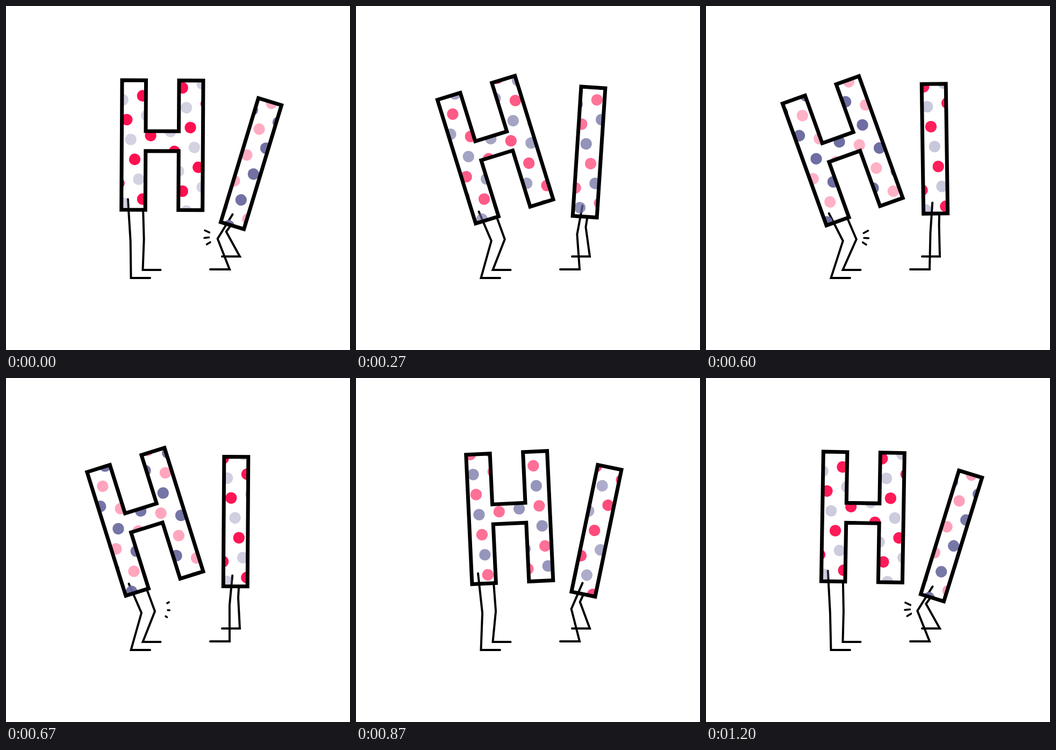
An HTML page with a canvas that plays this animation: 640x640 px, repeating every 1230 ms.

```html
<!DOCTYPE html>
<html lang="en">
<head>
<meta charset="utf-8">
<title>HI</title>
<style>
  html, body { margin: 0; width: 100%; height: 100%; overflow: hidden; background: #fff; }
  canvas { display: block; }
</style>
</head>
<body>
<canvas id="stage" width="640" height="640"></canvas>
<script>
const ctx = document.getElementById('stage').getContext('2d');
const LOOP = 1230, CYCLE = 31, RAD = Math.PI / 180;
const RED = '#ff0f50', SLATE = '#6b6ba0';

// Lean runs from `lean` to `lean - sweep` degrees; `bow` shifts the body sideways midway
const letters = [
  {
    lag: 0, pivot: [301.65, 367], lean: 1.45, sweep: 22.1, bow: 5,
    outline: [[214.5, 138.5], [259, 138.5], [259, 233], [320.5, 233], [320.5, 138.5], [365.5, 138.5],
              [365.5, 379.5], [320.5, 379.5], [320.5, 270], [259, 270], [259, 379.5], [214.5, 379.5]],
    dots: { center: [117.5, 190], origin: [239, 286], tilt: -11, turn: a => -a },
    redAlpha: fade => 1 - 0.7 * fade,
    front: { hip: [226.5, 360], knee: a => [232 - 1.15 * a, 437], foot: [[232.5, 506], [268, 506]] },
    back: { hip: [254, 352], knee: a => [257 - 1.15 * a, 434], foot: [[254.5, 491], [287.5, 491]] },
    ticks: { start: 9, lines: [[301.5, 418, -29], [302.5, 432, 3], [298, 444, 34]] }
  },
  {
    lag: 1, pivot: [351.7, 377.9], lean: 17.3, sweep: 18.4, bow: -3.5,
    outline: [[404.6, 146.1], [449.6, 146.1], [449.6, 387.1], [404.6, 387.1]],
    dots: { center: [301.5, 186], origin: [448, 277], tilt: -19.4, turn: a => (16.97 - a) / 2 },
    redAlpha: fade => 0.3 + 0.7 * fade,
    front: { hip: [421.4, 367], knee: a => [416.4 - 1.347 * a, 422.5 + 0.617 * a], foot: [[416, 490], [380, 490]] },
    back: { hip: [435, 355], knee: a => [432.5 - 1.35 * a, 408.7 + 0.67 * a], foot: [[435, 466], [402, 466]] },
    ticks: { start: 24, lines: [[370, 417.5, 205], [369, 431.5, 174], [373.5, 443.5, 148]] }
  }
];

const wrap = n => (n % CYCLE + CYCLE) % CYCLE;
const triangle = n => 1 - Math.abs(1 - 2 * wrap(n) / CYCLE);

// 0..1..0 over a cycle: a sine that lingers at both ends, returning a touch early
function swing(n) {
  const turn = 2 * Math.PI * (n - 4.4) / CYCLE;
  const phase = turn + 0.02 * (1 - Math.cos(turn));
  return 0.5 + 0.5 * Math.tanh(1.4 * Math.sin(phase)) / Math.tanh(1.4);
}

function rotateAbout([x, y], degrees) {
  ctx.translate(x, y);
  ctx.rotate(degrees * RAD);
  ctx.translate(-x, -y);
}

function rotated([x, y], [px, py], degrees) {
  const c = Math.cos(degrees * RAD), s = Math.sin(degrees * RAD);
  return [px + (x - px) * c - (y - py) * s, py + (x - px) * s + (y - py) * c];
}

function strokeLine(points, width) {
  ctx.lineWidth = width;
  ctx.beginPath();
  points.forEach(p => ctx.lineTo(...p));
  ctx.stroke();
}

function drawDots({ center, origin, tilt, turn }, angle, redAlpha) {
  rotateAbout(center, turn(angle));
  ctx.translate(...origin);
  ctx.rotate(tilt * RAD);
  for (let i = -9; i <= 9; i++) {
    for (let j = -9; j <= 9; j++) {
      const red = (i + j) % 2 === 0;
      ctx.fillStyle = red ? RED : SLATE;
      ctx.globalAlpha = red ? redAlpha : 1.3 - redAlpha;
      ctx.beginPath();
      ctx.arc(i * 37.7, j * 37.7, 10.7, 0, 7);
      ctx.fill();
    }
  }
}

// Short marks that fly away from the bent knee
function drawTicks({ start, lines }, n) {
  const age = wrap(n - start) / 9;
  if (age <= 0 || age >= 1) return;
  lines.forEach(([x, y, direction], i) => {
    const c = Math.cos(direction * RAD), s = Math.sin(direction * RAD);
    const far = (age - 2 / 3) * 8, near = far - (10.8 - i) * Math.sin(Math.PI * age);
    strokeLine([[x + near * c, y + near * s], [x + far * c, y + far * s]], 3.5);
  });
}

function drawLetter(letter, step) {
  const n = step - letter.lag, u = swing(n);
  const angle = letter.lean - letter.sweep * u;
  const place = point => {
    const [x, y] = rotated(point, letter.pivot, angle);
    return [x + letter.bow * u * (1 - u), y];
  };
  const drawLeg = ({ hip, knee, foot }) => strokeLine([place(hip), knee(angle), ...foot], 4);
  const shape = new Path2D();
  letter.outline.forEach(p => shape.lineTo(...place(p)));
  shape.closePath();

  drawLeg(letter.back);
  ctx.fillStyle = '#fff';
  ctx.fill(shape);
  drawLeg(letter.front);
  ctx.save();
  ctx.clip(shape);
  drawDots(letter.dots, angle, letter.redAlpha(triangle(n)));
  ctx.restore();
  ctx.lineWidth = 7;
  ctx.stroke(shape);
  drawTicks(letter.ticks, n);
}

function draw(now) {
  // 25 poses a second, shown at 30 frames a second
  const tick = Math.floor((now % LOOP + 3.4) * 0.03);
  const step = Math.ceil(tick * 5 / 6 - 0.5);
  ctx.fillStyle = '#fff';
  ctx.fillRect(0, 0, 640, 640);
  ctx.strokeStyle = '#000';
  ctx.lineCap = 'round';
  letters.forEach(letter => drawLetter(letter, step));
  requestAnimationFrame(() => draw(performance.now()));
}
draw(0);
</script>
</body>
</html>
```
